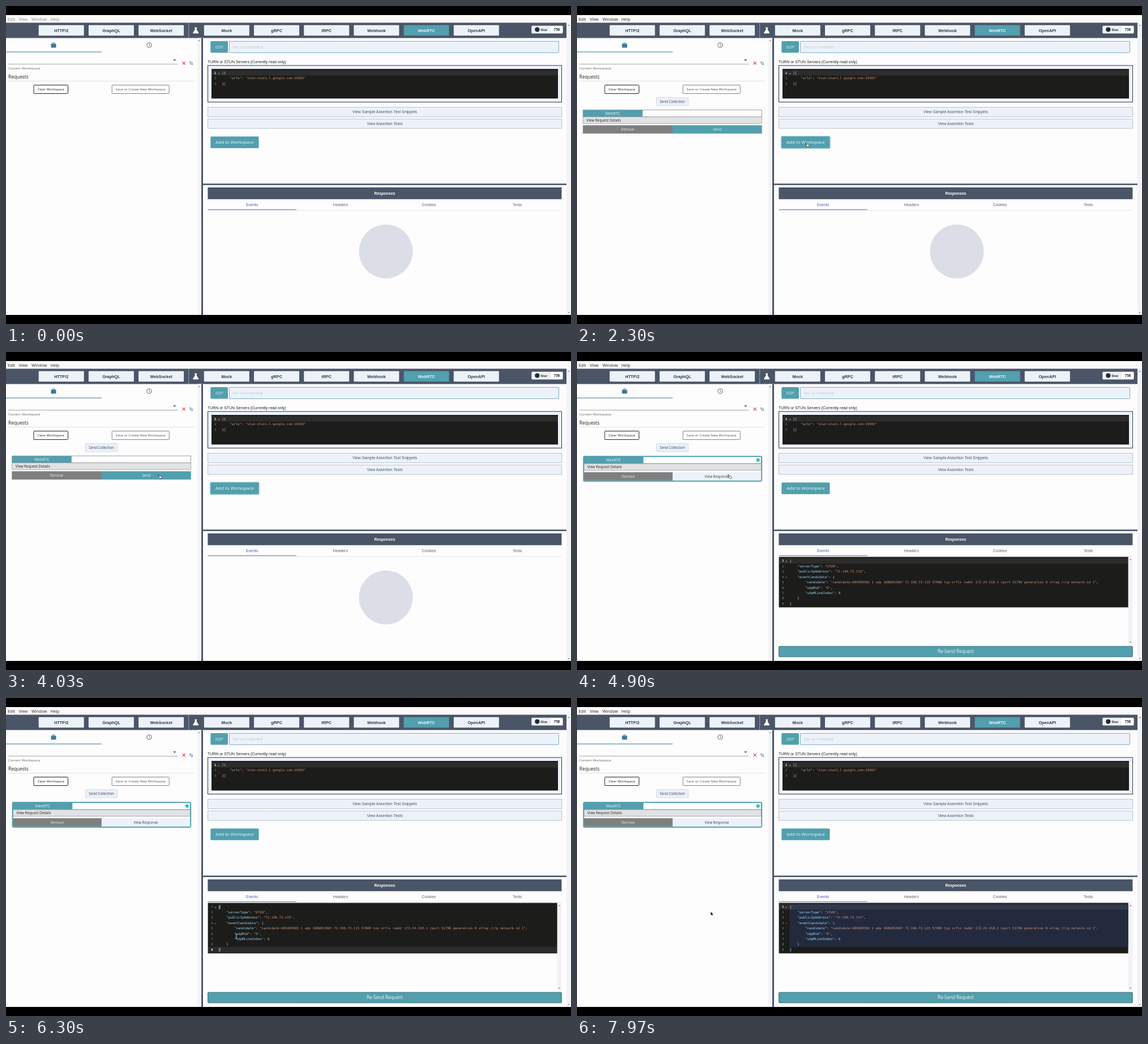
An HTML page for the animation above (8 s loop, 998x561 px).

```html
<!DOCTYPE html>
<html lang="en">
<head>
<meta charset="utf-8">
<title>API client</title>
<style>
html, body { margin: 0; width: 100%; height: 100%; overflow: hidden; background: #000; }
svg { display: block; width: 100%; height: 100%; }
text { white-space: pre; }
.sans { font-family: "Liberation Sans", Arial, sans-serif; }
.ui { font-family: "Open Sans", sans-serif; }
.roboto { font-family: Roboto, sans-serif; }
.mono { font-family: "DejaVu Sans Mono", monospace; }
</style>
</head>
<body>
<svg id="stage" viewBox="0 0 998 561"></svg>
<script>
const NS = 'http://www.w3.org/2000/svg';
const LOOP = 8000;
const PAGE = '#fdfdfe', SLATE = '#4a5568', TEAL = '#529fad', PALE = '#edf2f9';
const EDITOR = '#1c1c1a', ROW = 9.42, CODE_SIZE = 5.74;

const CLICK_ADD = 2150, CLICK_SEND = 4200, REPLY = 4350, CLICK_CODE = 6200, SELECT = 6400;

function add(parent, tag, attrs, content) {
  const el = document.createElementNS(NS, tag);
  for (const k in attrs) el.setAttribute(k, attrs[k]);
  if (content !== undefined) el.textContent = content;
  parent.appendChild(el);
  return el;
}
const group = parent => add(parent, 'g', {});
const rect = (p, x, y, w, h, fill, more) => add(p, 'rect', { x, y, width: w, height: h, fill, ...more });
const path = (p, d, stroke, width, fill = 'none') =>
  add(p, 'path', { d, fill, stroke, 'stroke-width': width });
const dot = (p, cx, cy, r, fill) => add(p, 'circle', { cx, cy, r, fill });

// y is the middle of the capitals
function label(p, s, x, y, size, fill, font = 'sans', anchor = 'start', more) {
  return add(p, 'text', {
    x, y: y + size * 0.36, 'font-size': size, fill, class: font, 'text-anchor': anchor, ...more
  }, s);
}
function button(p, x, y, w, h, fill, s, size, color, font, more, bold) {
  rect(p, x, y, w, h, fill, more);
  label(p, s, x + w / 2, y + h / 2, size, color, font, 'middle', bold && { 'font-weight': 700 });
}
function show(el, on) { el.setAttribute('display', on ? 'inline' : 'none'); }
const outline = (stroke, width = 1, rx = 0) => ({ stroke, 'stroke-width': width, rx });

function codeLine(p, s, x, y, keyColor) {
  const t = add(p, 'text', { x, y: y + 2, 'font-size': CODE_SIZE, class: 'mono', fill: '#d4d4d4' });
  for (const part of s.match(/"[^"]*"(?=:)|"[^"]*"|\d+|[^"\d]+/g)) {
    const isKey = part[0] === '"' && s.includes(part + ':');
    const fill = isKey ? keyColor : part[0] === '"' ? '#ce9178' : /\d/.test(part) ? '#b5cea8' : '#d4d4d4';
    add(t, 'tspan', { fill }, part);
  }
}
function lineNumber(p, n, x, y) {
  return label(p, n, x, y, 5.3, '#8a8a84', 'mono', 'end');
}
const chevron = (p, x, y, color) => path(p, `M${x - 1.4} ${y - .5}l1.4 1.5l1.4 -1.5`, color, .8);
const arrowHead = (p, x, y, dir) => add(p, 'path', { d: `M${x - 2} ${y + dir}l2 ${-2 * dir}l2 ${2 * dir}z`, fill: '#8b8b93' });

const svg = document.getElementById('stage');
rect(svg, 0, 0, 998, 561, '#000');
rect(svg, 0, 16, 998, 529, PAGE);

// menu bar
rect(svg, 0, 16, 998, 13.5, '#fbf8f9');
const menu = group(svg);
[['Edit', 3], ['View', 22.5], ['Window', 45], ['Help', 78.5]].forEach(([s, x]) =>
  label(menu, s, x, 23, 7.25, 'inherit', 'ui'));

// navigation
rect(svg, 0, 29.5, 990, 27, SLATE);
const tabs = ['HTTP/2', 'GraphQL', 'WebSocket', 'Mock', 'gRPC', 'tRPC', 'Webhook', 'WebRTC', 'OpenAPI'];
tabs.forEach((s, i) => {
  const on = s === 'WebRTC';
  button(svg, 57.7 + i * 88.2 + (i > 2 ? 27.5 : 0), 33.7, 80, 18.6, on ? TEAL : PALE, s, 7.28,
    on ? '#eef6fa' : '#2d3748', 'sans', { rx: 1 }, true);
});
rect(svg, 322.2, 29.5, 1, 27, '#98a1b2');
path(svg, 'M333 38.2h4.4M334 38.2v3.6l-3.4 5.2q-.4 1 .7 1h7.8q1.1 0 .7 -1l-3.4 -5.2v-3.6z', '#fff', .8, '#fff');
rect(svg, 928.5, 35, 55, 13.2, '#fff', outline('#c9d0d8', .6, 1.5));
rect(svg, 928.7, 35.2, 33.6, 12.8, '#ebf0f4', { rx: 1.5 });
dot(svg, 938.3, 41.6, 4.1, '#24292f');
label(svg, 'Star', 944.2, 41.6, 6.24, '#24292f', 'sans', 'start', { 'font-weight': 700 });
label(svg, '756', 973, 41.6, 6.5, '#24292f', 'sans', 'middle', { 'font-weight': 700 });

// page scrollbars and dividers
rect(svg, 990, 29.5, 8, 515.5, '#f2f2f7');
arrowHead(svg, 994, 34, 1);
arrowHead(svg, 994, 541, -1);
rect(svg, 338, 56.5, 7, 488.5, '#f4f4f8');
arrowHead(svg, 341, 61, 1);
rect(svg, 345, 56.5, 3, 488.5, SLATE);
rect(svg, 348, 313.3, 642, 2.6, SLATE);

// left panel
rect(svg, 79.5, 66.6, 9, 6.8, '#3f7699', { rx: .8 });
path(svg, 'M82.4 66.5v-1.5h3.2v1.5', '#3f7699', 1);
rect(svg, 0, 80.5, 169, 1.1, '#4a86a8');
add(svg, 'circle', { cx: 253, cy: 69, r: 4.1, fill: 'none', stroke: '#555', 'stroke-width': .9 });
path(svg, 'M253 66.4v2.9l2 1.2', '#555', .8);
rect(svg, 4, 102.3, 300, .7, '#858585');
add(svg, 'path', { d: 'M295 94.2h5.6l-2.8 2.7z', fill: '#555' });
path(svg, 'M311.6 98.2l5.2 5.2m0 -5.2l-5.2 5.2', '#dc3545', 1.1);
path(svg, 'M325.6 103v-5m-1.5 1.6l1.5 -1.7l1.5 1.7M328.6 98.6v5m-1.5 -1.6l1.5 1.7l1.5 -1.7', '#3d7ea0', .9);
label(svg, 'Current Workspace', 4, 109.5, 6.24, '#6f6f6f', 'roboto', 'start', { 'letter-spacing': '.0333em' });
label(svg, 'Requests', 4, 125.4, 8.4, '#222', 'ui');
rect(svg, 4, 132.2, 329, .7, '#d6d6d6');
button(svg, 49, 139.5, 60.5, 15, '#fff', 'Clear Workspace', 6.1, '#222', 'ui', outline('#222', 1, 1));
button(svg, 187.2, 139.5, 101, 15, '#fff', 'Save or Create New Workspace', 6.1, '#4a5060', 'ui', outline('#5d6472', .8, 1));

// request card, idle and answered
const collection = group(svg);
button(collection, 140.3, 161.4, 56.5, 14.6, '#ebf0f8', 'Send Collection', 6.2, '#3b4456', 'ui', outline('#c8d1e0', .7, 1));
function card(x, y, w, rowGap) {
  const g = group(svg);
  rect(g, x, y, w, 12.2, '#fff', outline('#707a88', .7));
  rect(g, x, y + .2, 105, 11.8, TEAL);
  label(g, 'WebRTC', x + 52.4, y + 5.9, 7, '#e9f4f7', 'ui', 'middle');
  rect(g, x, y + 12.4, w, 11.6, '#e1e2e4', outline('#8f8f96', .7));
  label(g, 'View Request Details', x + 6, y + 18.1, 6.3, '#222', 'ui');
  button(g, x, y + rowGap, w / 2, 14, '#7f7f80', 'Remove', 6.2, '#e8e8e8', 'ui', outline('#6d6d70', .5));
  return g;
}
const idle = card(10.8, 183.2, 315.6, 27.6);
button(idle, 168.9, 210.8, 157.5, 14, TEAL, 'Send', 6.3, '#e9f4f7', 'ui', outline('#4a8f9c', .5));
const answered = card(12.3, 184.6, 313, 27.8);
button(answered, 168.9, 212.4, 156.4, 14.2, PALE, 'View Response', 6.2, '#39425a', 'ui');
dot(answered, 319.8, 190.6, 3.1, '#27c8b4');
rect(answered, 11.6, 184.3, 314.6, 43.4, 'none', outline(TEAL, 1.9, 1.5));

// request form
button(svg, 361.3, 62, 30.7, 20.6, TEAL, 'SDP', 6.93, '#cfe6ec', 'sans', { rx: 1.5 });
rect(svg, 394.4, 62.3, 582, 20, PALE, outline('#6ba0be', .9, 1.5));
label(svg, 'No url needed', 400.3, 72.2, 8, '#c3c9d2', 'ui');
label(svg, 'TURN or STUN Servers (Currently read only)', 356, 99, 6.93, '#222');
rect(svg, 356.5, 104.9, 625, 64.6, PALE, outline('#2d3748'));
rect(svg, 363, 111, 612, 52.2, EDITOR);
rect(svg, 363, 113.2, 612, 9.4, '#2d2d2d');
['[{', '    "urls": "stun:stun1.l.google.com:19302"', '}]'].forEach((s, i) => {
  const y = 118 + i * ROW, n = lineNumber(svg, i + 1, 371.3, y);
  if (!i) { n.setAttribute('fill', '#fff'); n.setAttribute('font-weight', 700); }
  codeLine(svg, s, 381.5, y, '#b6bda6');
});
chevron(svg, 376, 119, '#ccc');
const wide = outline('#a9b2c0', .8);
button(svg, 356.4, 178.7, 625.2, 16.6, PALE, 'View Sample Assertion Test Snippets', 6.93, SLATE, 'sans', wide);
button(svg, 356.4, 199.3, 625.2, 16.6, PALE, 'View Assertion Tests', 6.93, SLATE, 'sans', wide);
const ring = rect(svg, 360.8, 229.8, 86, 21.4, 'none', outline('#a9d0dc', 1.8, 2));
button(svg, 361.3, 230.3, 85.2, 20.4, TEAL, 'Add to Workspace', 8, '#f1f8fa', 'ui', { rx: 1.5 });

// response panel
button(svg, 356.4, 320, 625, 20.8, SLATE, 'Responses', 6.93, '#fff', 'sans', {}, true);
['Events', 'Headers', 'Cookies', 'Tests'].forEach((s, i) =>
  label(svg, s, 434.6 + i * 156.2, 350.3, 6.93, i ? '#63636b' : '#4a5fae', 'sans', 'middle'));
rect(svg, 356.4, 360, 625, .7, '#dcdce0');
rect(svg, 356.4, 358.6, 156.4, 1.1, '#6c7fc0');
const emblem = dot(svg, 671, 433, 47.5, '#dcdee7');

const reply = group(svg);
rect(reply, 973.5, 361.5, 8, 155, '#f2f2f7');
arrowHead(reply, 977.5, 366, 1);
arrowHead(reply, 977.5, 512, -1);
rect(reply, 356.6, 361.5, 617, 89, EDITOR);
const TOP = 363.8, LEFT = 375.5;
const picked = path(reply, '', 'none', 0, '#232a3e');
const activeRow = rect(reply, 356.6, TOP, 617, ROW, '#fff', { 'fill-opacity': .07 });
const braces = group(reply);
[0, 8].forEach(i => rect(braces, LEFT, TOP + i * ROW + 1, 3.6, 7.6, '#46605f'));
const answer = {
  serverType: 'STUN',
  publicIpAddress: '72.196.73.115',
  eventCandidate: {
    candidate: 'candidate:685489583 1 udp 1686052607 72.196.73.115 57000 typ srflx raddr ' +
      '172.24.218.1 rport 51796 generation 0 ufrag /r/g network-id 1',
    sdpMid: '0',
    sdpMLineIndex: 0
  }
};
const numbers = JSON.stringify(answer, null, 4).split('\n').map((s, i) => {
  const y = 368.5 + i * ROW;
  codeLine(reply, s, LEFT, y, '#9cdcfe');
  return lineNumber(reply, i + 1, 365.4, y);
});
chevron(reply, 369.7, 369.3, '#ccc');
chevron(reply, 369.7, 397.4, '#999');
button(reply, 356.5, 519.2, 624.8, 18.6, TEAL, 'Re-Send Request', 8.1, '#eef7f9', 'ui', outline('#2f6672', .9, 1.5));

// pointers, tip at the origin
const pointer = group(svg);
const arrow = path(pointer, 'M0 0v7.4l1.7 -1.5l1.2 2.6l1.2 -.6l-1.2 -2.5h2.3z', '#fff', .6, '#111');
const hand = path(pointer, 'M-.6 .3q.9 -.7 1.4 .3l1.3 2.2l2.6 .3q1.2 .4 1.2 1.6l.2 2.3h-3.6l-2.3 -2.4q-.2 -.9 .9 -.6l.6 .3z', '#222', .7, '#fff');
const beam = group(pointer);
for (const [c, w] of [['#111', 1.8], ['#fff', .8]])
  path(beam, 'M-1.8 0q1.8 0 1.8 1q0 -1 1.8 -1M0 1v6M-1.8 8q1.8 0 1.8 -1q0 1 1.8 1', c, w);

// time, x, y
const route = [
  [1700, 520, 340], [2050, 404, 241], [2450, 404, 241], [3000, 281, 216.5], [3500, 281, 216.5],
  [4200, 267, 216], [4900, 267, 216], [5500, 408, 418], [5800, 408, 418], [6120, 404, 441],
  [6200, 404, 441], [6300, 407, 416.5], [6770, 372.3, 375.8], [7150, 371, 373.5], [7400, 366, 367], [7900, 236, 376.5]
];
function pointerAt(t) {
  const i = route.findIndex(k => k[0] > t);
  if (i < 0) return route[route.length - 1].slice(1);
  const a = route[Math.max(i - 1, 0)], b = route[i];
  const u = Math.max(0, (t - a[0]) / (b[0] - a[0])), e = u * u * (3 - 2 * u);
  return [a[1] + (b[1] - a[1]) * e, a[2] + (b[2] - a[2]) * e];
}

function draw(t) {
  const focused = t >= CLICK_ADD, replied = t >= REPLY, selecting = t >= SELECT;
  const [x, y] = pointerAt(t);

  menu.setAttribute('fill', focused ? '#222' : '#8d8a8c');
  show(collection, focused);
  show(idle, focused && !replied);
  show(answered, replied);
  show(ring, focused && t < CLICK_SEND);
  show(emblem, !replied);
  show(reply, replied);

  let row = t < CLICK_CODE ? 1 : 9;
  if (selecting) row = Math.min(9, Math.max(1, Math.floor((y - TOP) / ROW) + 1));
  if (t >= 7350) row = 1;
  const rowTop = TOP + (row - 1) * ROW, lastTop = TOP + 8 * ROW;
  const from = row === 1 ? LEFT : Math.max(LEFT, x);
  picked.setAttribute('d', selecting && row < 9
    ? `M${from} ${rowTop}H973.6V${lastTop}H${LEFT + 3.5}v${ROW}H${LEFT}V${rowTop + ROW}H${from}z` : '');
  activeRow.setAttribute('y', rowTop);
  show(braces, t >= CLICK_CODE && !selecting);
  numbers.forEach((n, i) => {
    const on = i + 1 === row;
    n.setAttribute('fill', on ? '#fff' : '#8a8a84');
    n.setAttribute('font-weight', on ? 700 : 400);
  });

  show(pointer, t >= 1700);
  pointer.setAttribute('transform', `translate(${x} ${y})`);
  const onButton = (x > 361 && x < 447 && y > 230 && y < 251) || (x > 169 && x < 326 && y > 210 && y < 227);
  const onCode = replied && x > 374 && x < 973 && y > 361 && y < 451;
  show(hand, onButton);
  show(beam, onCode);
  show(arrow, !onButton && !onCode);
}

const start = performance.now();
function tick() {
  draw((performance.now() - start) % LOOP);
  requestAnimationFrame(tick);
}
tick();
</script>
</body>
</html>
```
